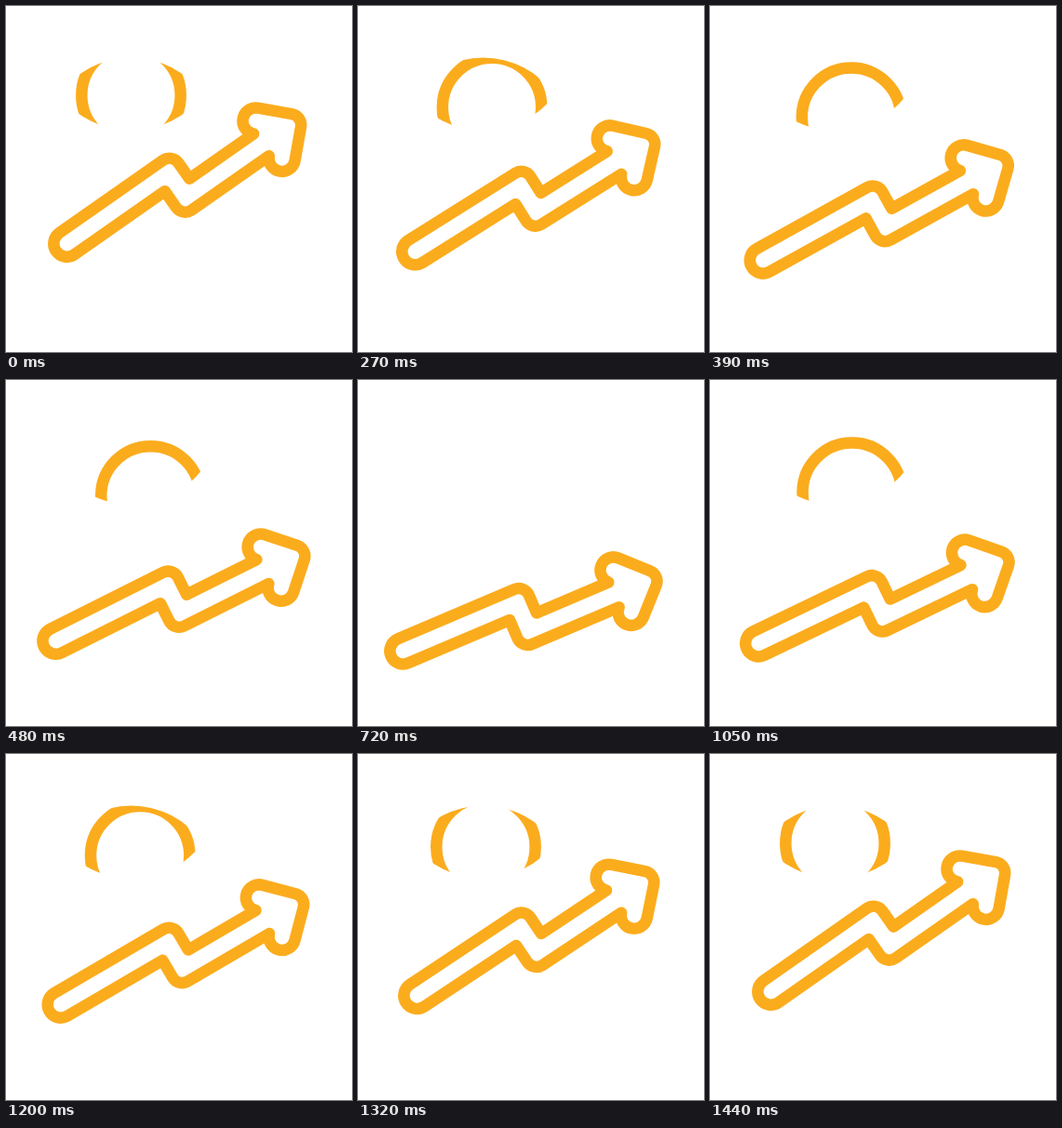
Write an HTML page that moves like this. It is 372 by 372 pixels and loops after 1.5 s.

```html
<!DOCTYPE html>
<html lang="en">
<head>
<meta charset="utf-8">
<title>Eye and arrow</title>
<style>
  html, body { margin: 0; width: 100%; height: 100%; overflow: hidden; background: #fff; }
  svg { display: block; width: 100%; height: 100%; }
</style>
</head>
<body>
<svg viewBox="0 0 372 372">
  <defs>
    <clipPath id="eye">
      <path id="lids" d="M-77 0A94.1 94.1 0 0 1 77 0A96.2 96.2 0 0 1 -77 0Z"/>
    </clipPath>
  </defs>
  <g fill="none" stroke="#fbac1d" stroke-width="12.5" stroke-linejoin="round">
    <g clip-path="url(#eye)"><circle id="iris" r="53.2"/></g>
    <path id="arrow" d="M0 -14.2H136A12 12 0 0 1 148 -2.2V18.4H232.1
      A14 14 0 0 1 251.9 -1.6L278 24.5A12 12 0 0 1 278 41.5L251.9 67.6
      A14 14 0 0 1 232.1 47.4H130.5A12 12 0 0 1 118.5 35.4V14.2H0
      A14.2 14.2 0 0 1 0 -14.2Z"/>
  </g>
</svg>
<script>
  const LOOP = 1500, STEP = 30;
  const [lids, iris, arrow] = ['lids', 'iris', 'arrow'].map(id => document.getElementById(id));

  const mix = (a, b, p) => a + (b - a) * p;
  const ease = (n, from, to) => {
    const x = Math.min(1, Math.max(0, (n - from) / (to - from)));
    return x * x * (3 - 2 * x);
  };
  // Ease out to 1 over a..b, stay, and ease back to 0 over c..d.
  const swing = (n, a, b, c, d) => ease(n, a, b) - ease(n, c, d);
  const move = (el, x, y, rest = '') =>
    el.setAttribute('transform', `translate(${x} ${y}) ${rest}`);

  function draw(time) {
    const n = Math.floor((time % LOOP) / STEP);
    const tilt = swing(n, 2, 24, 29.2, 48);
    const look = swing(n, 2, 17, 31, 48);
    const open = 1 - swing(n, 17, 24, 24, 31);

    move(arrow, mix(65.5, 48.5, tilt), mix(255.5, 291.3, tilt), `rotate(${mix(-35, -23, tilt)})`);
    move(iris, mix(134.5, 155.7, look), mix(96, 124.7, look));
    iris.style.visibility = open > 0 ? 'visible' : 'hidden';
    move(lids, 134.5, 95.5, `scale(1 ${Math.max(open, 0.001)})`);
  }

  let start;
  function tick(now) {
    start ??= now;
    draw(now - start);
    requestAnimationFrame(tick);
  }
  draw(0);
  requestAnimationFrame(tick);
</script>
</body>
</html>
```
